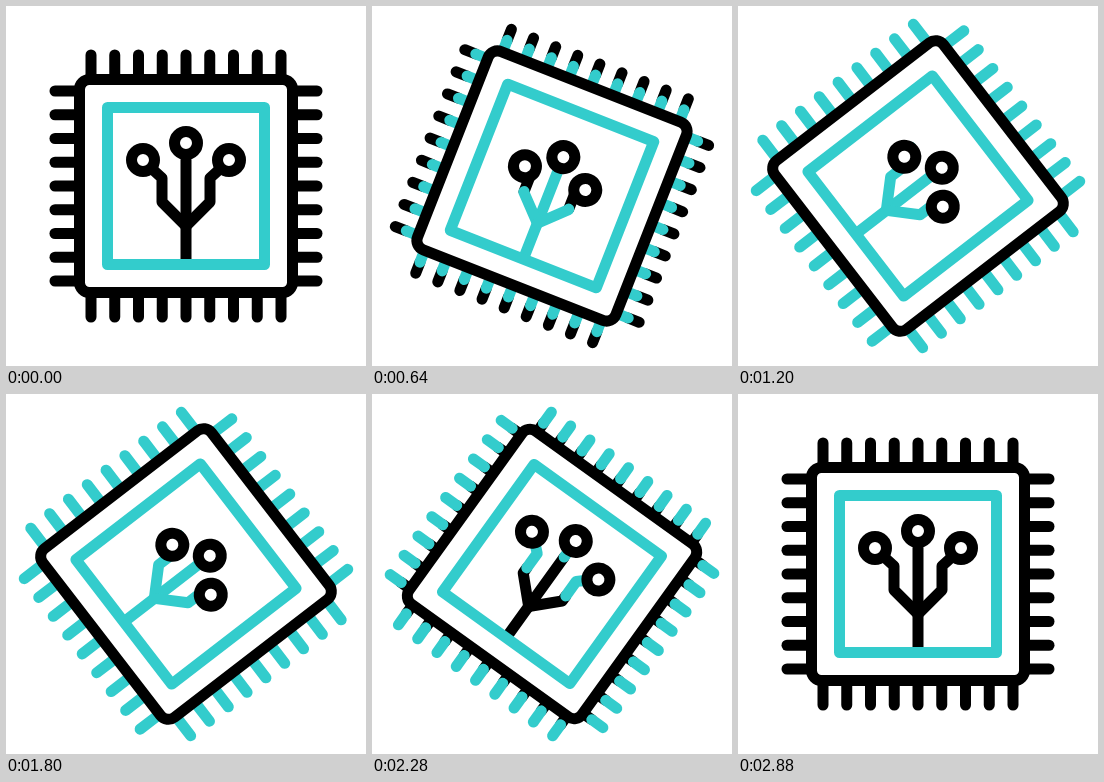
An HTML page with a canvas for the animation above (3000 ms loop, 360 by 360 pixels).

```html
<!DOCTYPE html>
<html lang="en">
<head>
<meta charset="utf-8">
<title>Chip</title>
<style>
  html, body { margin: 0; height: 100%; overflow: hidden; background: #fff; }
  canvas { display: block; width: 100vw; height: 100vh; }
</style>
</head>
<body>
<canvas id="stage" width="360" height="360"></canvas>
<script>
const ctx = document.getElementById('stage').getContext('2d');
const BLACK = '#000', TEAL = '#33cccc';
const LOOP = 3000, STEP = 40, OUT = 130, BACK = 1795, TURN = 52.4 * Math.PI / 180;

// Symmetric ease, cubic-bezier(.8, 0, .2, 1)
function ease(p) {
  if (p <= 0) return 0;
  if (p >= 1) return 1;
  let lo = -0.5, hi = 0.5;
  for (let i = 0; i < 24; i++) {
    const u = (lo + hi) / 2;
    if (0.3 * u + 2.8 * u ** 3 < p - 0.5) lo = u; else hi = u;
  }
  return 0.5 + 1.5 * lo - 2 * lo ** 3;
}

// Progress of the way out and of the way back
function phases(t, outEnd, backEnd) {
  return {
    out: ease((t - OUT) / (outEnd - OUT)),
    back: ease((t - BACK) / (backEnd - BACK))
  };
}

// Strokes the part of a polyline between two fractions of its length
function part(points, from, to, color) {
  if (to - from < 1e-4) return;
  let length = 0;
  ctx.beginPath();
  points.forEach(([x, y], i) => {
    ctx.lineTo(x, y);
    if (i) length += Math.hypot(x - points[i - 1][0], y - points[i - 1][1]);
  });
  ctx.setLineDash([(to - from) * length, 9999]);
  ctx.lineDashOffset = -from * length;
  ctx.strokeStyle = color;
  ctx.stroke();
  ctx.setLineDash([]);
}

function blackParts(points, { out, back }) {
  part(points, 0, back, BLACK);
  part(points, out, 1, BLACK);
}

function tealPart(points, { out, back }) {
  part(points, back, out, TEAL);
}

function pins(sweep) {
  for (let side = 0; side < 4; side++) {
    for (let i = -4; i <= 4; i++) {
      const x = i * 23.75, pin = [[x, -111], [x, -131]];
      blackParts(pin, sweep);
      tealPart(pin, sweep);
    }
    ctx.rotate(Math.PI / 2);
  }
}

function ring(x, y) {
  ctx.beginPath();
  ctx.arc(x, y, 11.5, 0, 7);
  ctx.fill();
  ctx.strokeStyle = BLACK;
  ctx.stroke();
}

const stem = [[0, 73], [0, -26]];
const branch = side => [[0, 40], [24 * side, 16], [24 * side, -8], [35 * side, -18]];

function draw(t) {
  const turn = phases(t, 1190, 2855);
  const stemSweep = phases(t, 850, 2450);
  const branchSweep = phases(t, 1160, 2745);
  const slide = phases(t, 860, 2600);
  const near = slide.out - slide.back;

  ctx.setTransform(1, 0, 0, 1, 0, 0);
  ctx.fillStyle = '#fff';
  ctx.fillRect(0, 0, 360, 360);
  ctx.translate(180, 180);
  ctx.rotate(TURN * (turn.out - turn.back));
  ctx.lineWidth = 11;
  ctx.lineCap = ctx.lineJoin = 'round';

  pins(turn);

  ctx.beginPath();
  ctx.roundRect(-106.5, -106.5, 213, 213, 10);
  ctx.fill();
  ctx.strokeStyle = BLACK;
  ctx.stroke();

  const wires = [[stem, stemSweep], [branch(-1), branchSweep], [branch(1), branchSweep]];
  for (const wire of wires) blackParts(...wire);
  for (const wire of wires) tealPart(...wire);

  ctx.strokeStyle = TEAL;
  ctx.strokeRect(-78.5, -78.5, 157, 157);

  ring(0, -43 + 13 * near);
  for (const side of [-1, 1]) ring(side * (43 - 11.5 * near), -26 + 19 * near);
}

const start = performance.now();
function tick() {
  const t = (performance.now() - start) % LOOP;
  draw(Math.floor(t / STEP) * STEP);
  requestAnimationFrame(tick);
}
tick();
</script>
</body>
</html>
```
